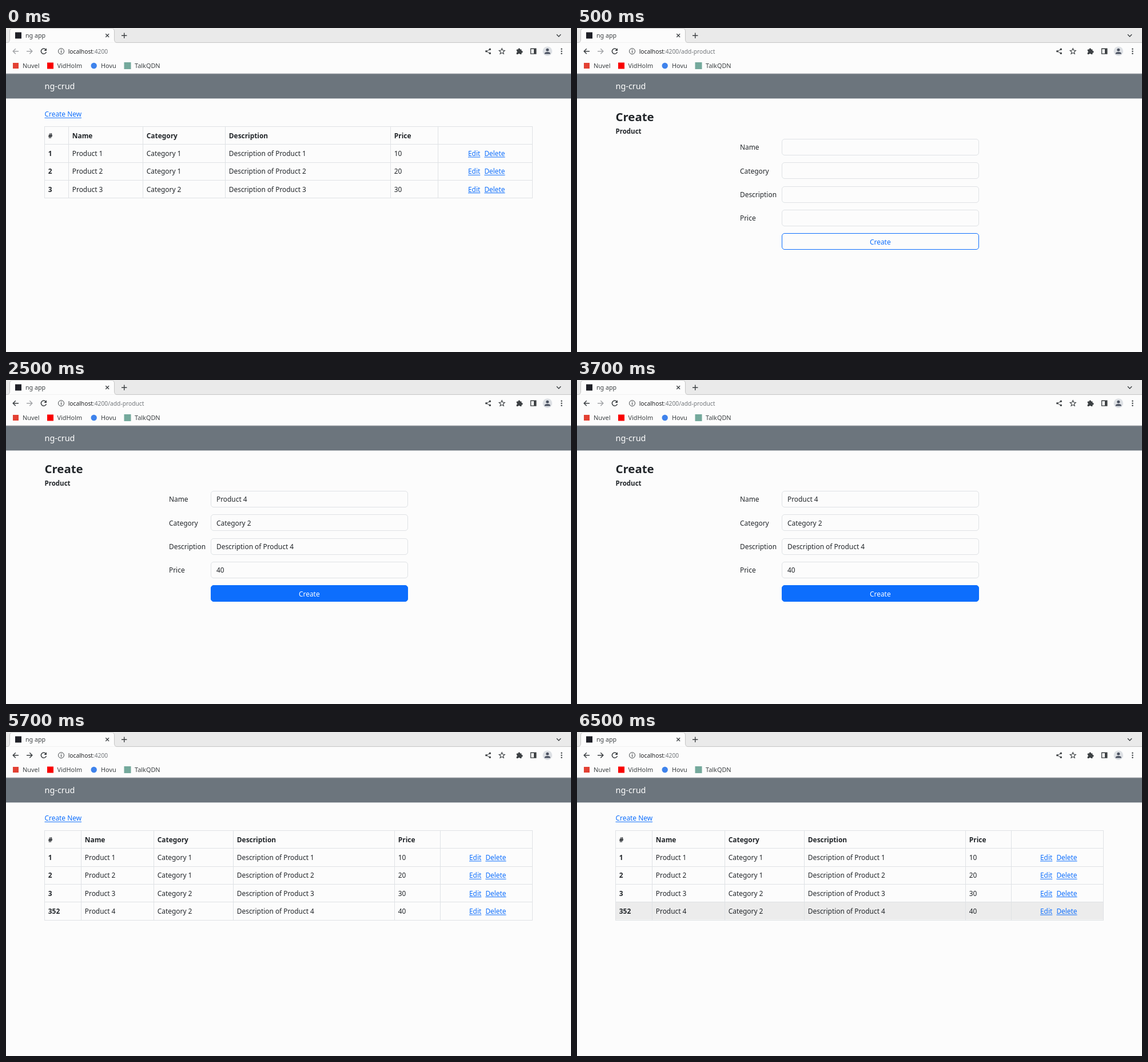
Recreate the animation shown at these times as an HTML page with a canvas. Size 988 by 567 pixels, loop 8 s.

```html
<!DOCTYPE html>
<html lang="en">
<head>
<meta charset="utf-8">
<title>ng app</title>
<style>
html, body { margin: 0; width: 100%; height: 100%; overflow: hidden; background: #fcfcfc; }
canvas { display: block; }
</style>
</head>
<body>
<canvas id="stage" width="988" height="567"></canvas>
<script>
const ctx = document.getElementById('stage').getContext('2d');
const LOOP = 8000;
const INK = '#212529', LINK = '#0d6efd', BORDER = '#dfe2e5';
const ICON = '#3c4043', FAINT = '#a3a5a8', PAGE = '#fcfcfc';
const BODY = 11.9;

function text(str, x, y, { size = BODY, weight = 400, color = INK, align = 'left' } = {}) {
  ctx.font = `${weight} ${size}px "Noto Sans", "Open Sans", sans-serif`;
  ctx.fillStyle = color;
  ctx.textAlign = align;
  ctx.fillText(str, x, y);
  return ctx.measureText(str).width;
}

function rect(x, y, w, h, color) {
  ctx.fillStyle = color;
  ctx.fillRect(x, y, w, h);
}

function disc(x, y, r, color) {
  ctx.fillStyle = color;
  ctx.beginPath();
  ctx.arc(x, y, r, 0, Math.PI * 2);
  ctx.fill();
}

function stroke(d, color = ICON, width = 1.4) {
  ctx.strokeStyle = color;
  ctx.lineWidth = width;
  ctx.stroke(new Path2D(d));
}

function fill(d, color = ICON) {
  ctx.fillStyle = color;
  ctx.fill(new Path2D(d));
}

function box(x, y, w, h, r, line, back) {
  ctx.beginPath();
  ctx.roundRect(x, y, w, h, r);
  if (back) {
    ctx.fillStyle = back;
    ctx.fill();
  }
  ctx.strokeStyle = line;
  ctx.lineWidth = 1;
  ctx.stroke();
}

function link(str, x, y) {
  const w = text(str, x, y, { color: LINK });
  rect(x, y + 1.6, w, 1, LINK);
  return w;
}

function drawTabs() {
  rect(0, 0, 988, 26, '#eaeaea');
  const tab = 'M0 25.5 H2 Q6.5 25.5 6.5 20 V6 Q6.5 .5 12 .5 H184 Q189.5 .5 189.5 6 V20 Q189.5 25.5 194 25.5 H988';
  fill(tab, PAGE);
  stroke(tab, '#c6c6c6', 1);
  rect(16, 7.5, 11, 11, '#1f2027');
  text('ng app', 34, 17, { size: 10.7, color: ICON });
  stroke('M174.3 10.2 l5.8 5.8 M180.1 10.2 l-5.8 5.8', ICON, 1.3);
  stroke('M202 13.2 h9.4 M206.7 8.5 v9.4');
  stroke('M963 11.3 l3.6 3.6 l3.6 -3.6');
}

function drawStar(cx, cy) {
  let d = '';
  for (let i = 0; i < 10; i++) {
    const r = i % 2 ? 2.4 : 5.3;
    const a = i * Math.PI / 5 - Math.PI / 2;
    d += `${i ? 'L' : 'M'}${cx + r * Math.cos(a)} ${cy + r * Math.sin(a)}`;
  }
  stroke(d + 'Z', ICON, 1.1);
}

function drawToolbar(path, canBack, canForward) {
  rect(0, 26, 988, 54, PAGE);
  stroke('M22 40.7 H12.5 M16.8 36.2 L12.3 40.7 L16.8 45.2', canBack ? ICON : FAINT, 1.5);
  stroke('M36 40.7 H45.5 M41.3 36.2 L45.8 40.7 L41.3 45.2', canForward ? ICON : FAINT, 1.5);
  stroke('M69.3 37.5 A4.6 4.6 0 1 0 70.4 42', ICON, 1.5);
  fill('M71 35.3 V40 H66.3 Z');

  stroke('M101.5 40.7 a5 5 0 1 1 -10 0 a5 5 0 1 1 10 0', ICON, 1);
  rect(95.9, 40, 1.2, 3.5, ICON);
  rect(95.9, 37.7, 1.2, 1.3, ICON);
  const w = text('localhost', 108.7, 44.5, { size: 10.25, color: '#202124' });
  text(path, 108.7 + w, 44.5, { size: 10.25, color: '#73777b' });

  stroke('M846.3 37.4 L839.8 40.8 L846.3 44.2', ICON, 1);
  disc(846.3, 37.3, 1.7, ICON);
  disc(839.8, 40.8, 1.7, ICON);
  disc(846.3, 44.3, 1.7, ICON);
  drawStar(867.2, 41);
  fill('M893 37.5 h2.7 a1.7 1.7 0 1 1 3.3 0 h2.5 v2.7 a1.7 1.7 0 1 1 0 3.3 v2.5 h-2.8 a1.6 1.6 0 0 0 -3.1 0 h-2.9 v-2.8 a1.6 1.6 0 0 0 0 -3.1 z');
  stroke('M917.6 36.3 h9.2 v8.8 h-9.2 z', ICON, 1.4);
  rect(923, 36, 4, 9, ICON);
  disc(946.8, 40.7, 8.3, '#dde0e4');
  disc(946.8, 38.3, 2.5, '#4a5160');
  fill('M941.8 45.5 v-1 q0 -2.6 5 -2.6 q5 0 5 2.6 v1 z', '#4a5160');
  for (const y of [36.8, 40.8, 44.8]) disc(971.5, y, 1.2, ICON);

  const mark = { size: 10.9, color: ICON };
  rect(12, 61, 10, 10, '#e34133');
  text('Nuvel', 29, 69.6, mark);
  rect(72, 60.5, 11, 11, '#f90000');
  text('VidHolm', 89.5, 69.6, mark);
  disc(153.7, 66, 5.2, '#3f83ec');
  text('Hovu', 166, 69.6, mark);
  rect(206.5, 60, 12, 12, '#74a99c');
  text('TalkQDN', 225, 69.6, mark);
}

function drawNavbar() {
  rect(0, 80, 988, 43.4, '#6c757d');
  rect(0, 79.5, 988, 1, '#a9adb1');
  text('ng-crud', 67.5, 107, { size: 14.4, color: '#fff' });
}

function drawTable(cols, ids, highlight) {
  const top = 172.5, rowH = 31.35;
  const lineY = i => Math.floor(top + i * rowH);
  const bottom = lineY(ids.length + 1);
  const bold = { weight: 700 };

  link('Create New', 67.5, 155.2);
  if (highlight) rect(67, lineY(ids.length), 854, rowH, '#ececec');
  for (let i = 0; i <= ids.length + 1; i++) rect(67, lineY(i), 854, 1, BORDER);
  for (const x of cols) rect(x, 172, 1, bottom - 171, BORDER);

  ['#', 'Name', 'Category', 'Description', 'Price']
    .forEach((head, c) => text(head, cols[c] + 6.8, 192.5, bold));

  ids.forEach((id, i) => {
    const n = i + 1, y = 192.5 + n * rowH;
    text(id, cols[0] + 6.8, y, bold);
    [`Product ${n}`, `Category ${n < 3 ? 1 : 2}`, `Description of Product ${n}`, `${n * 10}`]
      .forEach((cell, c) => text(cell, cols[c + 1] + 6.8, y));
    const x = (cols[5] + cols[6]) / 2 - 29.5;
    link('Edit', x, y);
    link('Delete', x + 28.4, y);
  });
}

function drawForm(values, active) {
  const pitch = 41.3, x = 358.5, w = 344, h = 28;
  const boxY = i => Math.round(194 + i * pitch) + 0.5;
  text('Create', 67.5, 162.5, { size: 20.4, weight: 600 });
  text('Product', 67.5, 185, { size: 11.5, weight: 700 });
  ['Name', 'Category', 'Description', 'Price'].forEach((label, i) => {
    const y = 213.4 + i * pitch;
    text(label, 285, y);
    box(x, boxY(i), w, h, 4.5, BORDER);
    text(values[i] || '', 368, y);
  });
  box(x, boxY(4), w, h, 4.5, LINK, active ? LINK : null);
  text('Create', 530.3, 213.4 + 4 * pitch, { color: active ? '#fff' : LINK, align: 'center' });
}

const NARROW = [67, 109, 239, 383, 672, 755, 920];
const WIDE = [67, 131, 258, 397, 679, 759, 920];
const ENTRY = ['Product 4', 'Category 2', 'Description of Product 4', '40'];

function render(t) {
  const adding = t >= 500 && t < 4500;
  const saved = t >= 4500;
  rect(0, 0, 988, 567, PAGE);
  drawTabs();
  drawToolbar(adding ? ':4200/add-product' : ':4200', t >= 500, saved);
  drawNavbar();
  if (adding) drawForm(t >= 2500 ? ENTRY : [], t >= 2500);
  else if (saved) drawTable(WIDE, ['1', '2', '3', '352'], t >= 6500);
  else drawTable(NARROW, ['1', '2', '3'], false);
}

const start = performance.now();
function tick() {
  render((performance.now() - start) % LOOP);
  requestAnimationFrame(tick);
}
tick();
</script>
</body>
</html>
```
